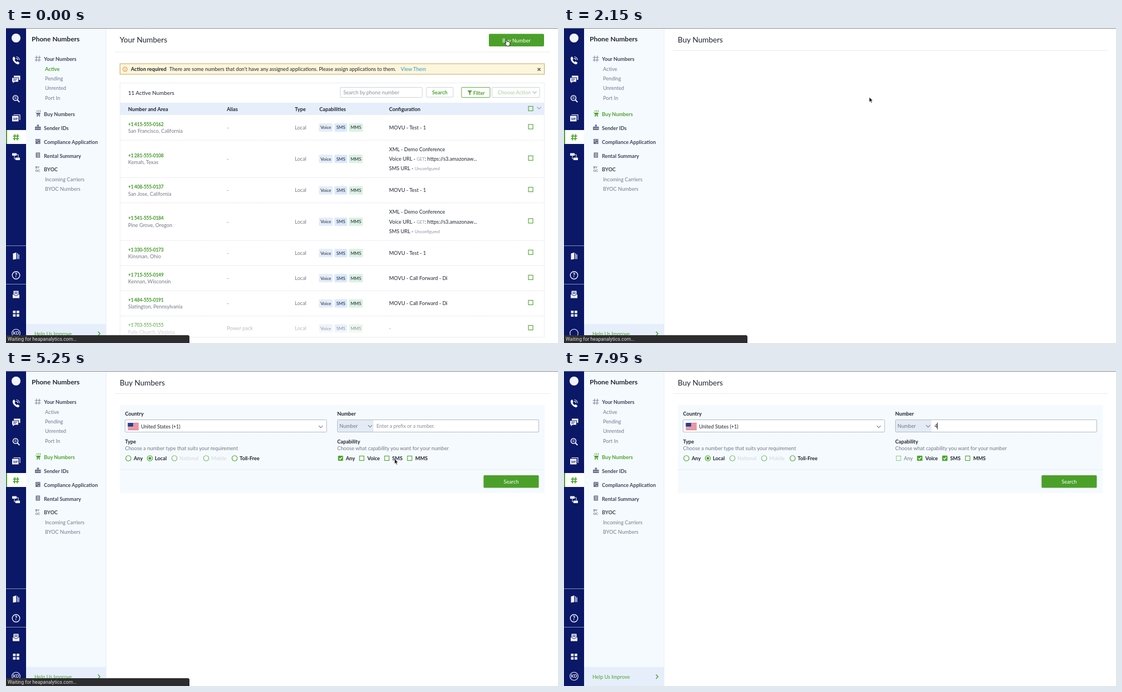
An HTML page for the animation above (8 s loop, 990x565 px).

```html
<!DOCTYPE html>
<html lang="en">
<head>
<meta charset="utf-8">
<title>Buy Numbers</title>
<style>
html,body{margin:0;width:100%;height:100%;overflow:hidden;background:#fff}
svg{display:block}
text{font:9.2px Lato,sans-serif;fill:#1f2530;white-space:pre}
.b,.b text{font-weight:700}
.side text{fill:#3c4557}
.side .sub{fill:#727b8c;font-size:9.1px;letter-spacing:.03px}
.side .on,.on{fill:#4ba32c}
.h1{font-size:13.6px}
.grey{fill:#737983}
.mini{font-size:7.6px;fill:#8d939e}
.num{font-size:8.6px;font-weight:700;letter-spacing:-.33px;fill:#3f9a25}
.tag{font-size:8px;text-anchor:middle}
.line{fill:none;stroke:#4ba32c;stroke-width:1.1}
.chev{fill:none;stroke:#6d7687;stroke-width:1.1}
.white{fill:#fff}
.mid{text-anchor:middle}

/* Hard switches; percentages are ms / 80, a few ms ahead of the change */
.k{animation:8s step-end infinite}
@keyframes list{0%{opacity:1}11.8%,to{opacity:0}}
@keyframes buy{0%{opacity:0}11.8%,to{opacity:1}}
@keyframes cart{0%{opacity:0}15.56%,to{opacity:1}}
@keyframes initials{0%{opacity:1}11.8%{opacity:0}30.56%,to{opacity:1}}
@keyframes form{0%{opacity:0}30.56%,to{opacity:1}}
@keyframes flag{0%{opacity:0}33.06%,to{opacity:1}}
@keyframes any-type{0%{opacity:1}56.81%,to{opacity:0}}
@keyframes local{0%{opacity:0}56.81%,to{opacity:1}}
@keyframes any-cap{0%{opacity:1}71.81%,to{opacity:0}}
@keyframes voice{0%{opacity:0}71.81%,to{opacity:1}}
@keyframes sms{0%{opacity:0}78.06%,to{opacity:1}}
@keyframes hint{0%{opacity:1}98.69%,to{opacity:0}}
@keyframes typed{0%{opacity:0}98.69%,to{opacity:1}}
@keyframes caret{0%{opacity:0}85.56%{opacity:1}91.81%{opacity:0}98.06%{opacity:1}98.69%,to{opacity:1;transform:translateX(4px)}}
@keyframes hand{0%{opacity:1}26.81%{opacity:0}52.44%{opacity:1}60.56%{opacity:0}68.06%{opacity:1}79.94%,to{opacity:0}}
@keyframes arrow{0%{opacity:0}26.81%{opacity:1}52.44%{opacity:0}60.56%{opacity:1}68.06%{opacity:0}79.94%{opacity:1}81.19%,to{opacity:0}}
@keyframes beam{0%{opacity:0}81.19%{opacity:1}84.31%,to{opacity:0}}

.status{animation:status 8s linear infinite}
@keyframes status{
  0%{opacity:1}4.375%,11.8%{opacity:0}11.81%,71.1%{opacity:1}75.6%,to{opacity:0}
}
.cursor{animation:move 8s linear infinite}
@keyframes move{
  0%,20.625%{transform:translate(897px,21px)}
  21.25%{transform:translate(820px,44px)}
  21.875%{transform:translate(680px,90px)}
  22.5%{transform:translate(585px,117px)}
  23.125%,38.75%{transform:translate(547.5px,124px)}
  39.375%{transform:translate(535px,126px)}
  40.625%{transform:translate(430px,143px)}
  41.875%{transform:translate(312px,157px)}
  42.5%{transform:translate(293px,157px)}
  45.625%,50%{transform:translate(273px,156px)}
  53.125%,60%{transform:translate(259.5px,154.5px)}
  61.25%{transform:translate(400px,149px)}
  61.875%{transform:translate(560px,144px)}
  62.5%{transform:translate(680px,153px)}
  63.125%,64.375%{transform:translate(727.5px,160px)}
  66.5%{transform:translate(676px,156px)}
  68.75%,71.875%{transform:translate(647px,154px)}
  75.625%,79.375%{transform:translate(696px,154px)}
  80%{transform:translate(697px,142px)}
  81.25%{transform:translate(696px,108px)}
  81.875%,to{transform:translate(695px,98.5px)}
}
</style>
</head>
<body>
<svg width="990" height="565" viewBox="0 0 990 565">
<defs>
  <linearGradient id="fade" x2="0" y2="1"><stop stop-color="#fff" stop-opacity=".1"/><stop offset="1" stop-color="#fff" stop-opacity=".85"/></linearGradient>
  <path id="chev" d="M-3.5-1.8 0 1.8 3.5-1.8"/>
  <path id="hash" d="M-2-5.5-3 5.5M3-5.5 2 5.5M-5.5-2.2H5.5M-5.5 2.4H5.5"/>
  <g id="tick"><rect x="-4.5" y="-4.5" width="9" height="9" rx="1" fill="#4ba32c"/><path d="M-2.5 0-.7 2 2.7-2" fill="none" stroke="#fff" stroke-width="1.3"/></g>
  <rect id="box" x="-4" y="-4" width="8" height="8" class="line"/>
  <circle id="radio" r="4.7" class="line"/>
  <g id="cart"><path d="M52 151h1.8l1.4 4.5h5.6l1.2-3.5h-7.2zM55 156h6v1h-6z"/><circle cx="56" cy="158.3" r="1"/><circle cx="60" cy="158.3" r="1"/><path d="M55 147.5v2.6M57 148h1.5l-1.5 2h1.7M60 148h1.7v2H60" fill="none" stroke="currentColor" stroke-width=".8"/></g>
</defs>

<rect width="990" height="565" fill="#fff"/>

<!-- navigation rail -->
<rect width="36" height="565" fill="#0a1867"/>
<path d="M0 390.5H36M0 459.5H36" stroke="#8990b8"/>
<path d="M0 183H36V208H0z" fill="#fff"/>
<path d="M0 183H2V208H0z" fill="#4ba32c"/>
<use href="#hash" x="18" y="196" fill="none" stroke="#4ba32c" stroke-width="1.8"/>
<g fill="#f2f4fc">
  <circle cx="18" cy="18" r="8"/>
  <path d="M12 53l2.5-2 2.5 4-1.5 1.7q1 3 3.5 4.3l1.8-1.2 3.7 2.8-2 2.4q-3 1-7-3-4.5-4.5-3.5-9z"/>
  <path d="M18.5 51.5q5 .7 5.8 6M18.2 54.3q2.8.3 3.3 3" fill="none" stroke="#f2f4fc" stroke-width="1.2"/>
  <path d="M14 85.5h11.5v7.5H23v-4.5h-9z"/><path d="M11 89.5h11v7h-6.5l-3 2.5v-2.5H11z"/>
  <path d="M13 91.7h7M13 94h5" stroke="#0a1867" stroke-width=".9"/>
  <circle cx="17" cy="125.5" r="4.5" fill="none" stroke="#f2f4fc" stroke-width="1.6"/><path d="M20.3 129l4 4" stroke="#f2f4fc" stroke-width="2"/><path d="M15 124h4M15 126.5h4" stroke="#f2f4fc"/>
  <path d="M11 157.5h11.5v10H11z"/><path d="M13.5 155.5h11.5v9.5" fill="none" stroke="#f2f4fc" stroke-width="1.2"/>
  <text x="16.8" y="164.8" class="b mid" style="font-size:5.5px;fill:#0a1867">SIP</text>
  <path d="M11 224.5h8v4.5h-8zM17 232.5h8v4.5h-8z"/><path d="M15 229v5.7h3M19 227h3v5.5" fill="none" stroke="#f2f4fc"/>
  <path d="M12.5 404.5l6-2v12l-6 1zM20 404h1.3v10.5H20zM22.4 406h1.3v8.5h-1.3z"/>
  <circle cx="18" cy="443.5" r="6.7" fill="none" stroke="#f2f4fc" stroke-width="1.4"/><text x="18" y="447.3" class="b mid white" style="font-size:10.5px">?</text>
  <path d="M13.5 471.5h9v6l-4.5 2.5-4.5-2.5zM12 477.5l6 3.5 6-3.5v7H12z"/><path d="M15 474h6M15 476.3h6" stroke="#0a1867"/>
  <path d="M12.5 507h4.8v4.5h-4.8zM19 507h4.8v4.5H19zM12.5 513.3h4.8v4.5h-4.8zM19 513.3h4.8v4.5H19z"/>
  <circle cx="18" cy="547.5" r="7.3" fill="none" stroke="#f2f4fc" stroke-width="1.1"/>
  <text x="18" y="550.2" class="b mid white k" style="font-size:7.5px;animation-name:initials">KD</text>
</g>

<!-- sidebar -->
<rect x="36" width="143" height="565" fill="#f5faff"/>
<rect x="36" y="531" width="143" height="34" fill="#e6eefb"/>
<path d="M179.5 0V565" stroke="#e8eef6"/>
<g class="side">
  <text x="46" y="23.5" class="b" style="font-size:12px;fill:#1f2530">Phone Numbers</text>
  <g class="b">
    <text x="68" y="59.2">Your Numbers</text>
    <text x="68" y="183">Sender IDs</text>
    <text x="68" y="207.7">Compliance Application</text>
    <text x="68" y="232.5">Rental Summary</text>
    <text x="68" y="257.3">BYOC</text>
  </g>
  <text x="70" y="93.7" class="sub">Pending</text>
  <text x="70" y="110.8" class="sub">Unrented</text>
  <text x="70" y="128.7" class="sub">Port In</text>
  <text x="70" y="274.5" class="sub">Incoming Carriers</text>
  <text x="70" y="291.7" class="sub">BYOC Numbers</text>
  <g class="k" style="animation-name:list">
    <text x="70" y="76.5" class="b on">Active</text>
    <text x="68" y="158.2" class="b">Buy Numbers</text>
    <use href="#cart" fill="#66718a" color="#66718a"/>
  </g>
  <g class="k" style="animation-name:buy">
    <text x="70" y="76.5" class="sub">Active</text>
    <text x="68" y="158.2" class="b on">Buy Numbers</text>
    <use href="#cart" fill="#4ba32c" color="#4ba32c" class="k" style="animation-name:cart"/>
  </g>
  <use href="#hash" x="57" y="55" fill="none" stroke="#7a8498"/>
  <g fill="#66718a">
    <path d="M52 177h10.5v6H52zM55.5 173.5h3.5v3h-3.5z"/><path d="M53.5 180h2M56.5 180h2M59.5 180h2" stroke="#fff"/>
    <path d="M53 199h8.5v9H53z"/><path d="M54.5 201h3M54.5 203.5h2M58.5 201.5l2-1M57 206h3" stroke="#fff" stroke-width=".9"/>
    <path d="M53.5 223.5h7.5v9h-7.5z"/><path d="M55 225.7h5M55 228h5M55 230.3h5" stroke="#fff" stroke-width=".9"/>
  </g>
  <text x="52.5" y="252" style="font-size:6px">BY</text>
  <text x="52.5" y="257.5" style="font-size:6px">OC</text>
  <text x="51" y="551.5" class="on">Help Us Improve</text>
  <path d="M165 544.5l3.5 3.7-3.5 3.7" class="line" style="stroke-width:1.5"/>
</g>

<!-- active numbers page -->
<g class="k" style="animation-name:list">
  <text x="204" y="25.5" class="h1">Your Numbers</text>
  <path d="M195 43H975" stroke="#ececee"/>
  <rect x="866" y="10.5" width="99" height="22.5" rx="2" fill="#4ba02a"/>
  <text x="915.5" y="25.5" class="mid white">Buy Number</text>
  <rect x="204.5" y="64" width="761" height="19" fill="#fdf6dc" stroke="#c5a863"/>
  <circle cx="213.5" cy="74" r="3.9" fill="none" stroke="#e08a2c"/><path d="M213.5 71.5v1M213.5 73.3v3" stroke="#e08a2c"/>
  <text x="224" y="77.2" class="b">Action required</text>
  <text x="293" y="77.2" style="font-size:9.1px">There are some numbers that don't have any assigned applications. Please assign applications to them.</text>
  <text x="708" y="77.2" style="fill:#2a98d0">View Them</text>
  <path d="M953.5 71.8l5 5M958.5 71.8l-5 5" stroke="#5c5f5f" stroke-width="1.6"/>
  <rect x="204.5" y="98.5" width="761" height="456" fill="none" stroke="#eceef2"/>
  <text x="219" y="120" style="font-size:9.8px">11 Active Numbers</text>
  <g fill="#fff" stroke="#cfd3d9">
    <rect x="599.5" y="106.5" width="147" height="18" rx="1"/>
    <rect x="754" y="106.5" width="48" height="17.5" rx="1"/>
    <rect x="817" y="106.5" width="51" height="18" rx="1" stroke="#5fae43"/>
    <rect x="871.5" y="106.5" width="85.5" height="18" rx="1"/>
  </g>
  <text x="605" y="119" style="fill:#8a9099">Search by phone number</text>
  <text x="778" y="118.5" class="b on mid">Search</text>
  <path d="M827.5 112h8.5l-3.2 4v4.5l-2-1.3V116z" fill="#4ba32c"/>
  <text x="838" y="119.5" class="b on" style="font-size:8.8px">Filter</text>
  <text x="882" y="119" style="fill:#a8cf9b">Choose Action</text>
  <use href="#chev" x="948" y="115.5" class="chev" opacity=".6"/>
  <rect x="204" y="134" width="762" height="22" fill="#e6eefb"/>
  <g class="b">
    <text x="219" y="148.7">Number and Area</text>
    <text x="396" y="148.7">Alias</text>
    <text x="518" y="148.7">Type</text>
    <text x="562" y="148.7">Capabilities</text>
    <text x="687" y="148.7">Configuration</text>
  </g>
  <use href="#box" x="941" y="144.5"/>
  <use href="#chev" x="956" y="143.5" class="chev" opacity=".7"/>
  <g id="rows"></g>
  <rect x="205" y="522" width="725" height="32" fill="url(#fade)"/>
</g>

<!-- purchase page -->
<g class="k" style="animation-name:buy">
  <text x="204" y="25.5" class="h1">Buy Numbers</text>
  <path d="M195 40.5H975" stroke="#ececee"/>
</g>
<g class="k" style="animation-name:form">
  <rect x="204" y="61" width="762" height="158" fill="#f5faff"/>
  <path d="M204 177H966" stroke="#e6ecf3"/>
  <g class="b">
    <text x="213.5" y="80">Country</text>
    <text x="594" y="80">Number</text>
    <text x="213.5" y="129.5">Type</text>
    <text x="594" y="129.5">Capability</text>
  </g>
  <text x="213.5" y="142" class="grey">Choose a number type that suits your requirement</text>
  <text x="594" y="142" class="grey">Choose what capability you want for your number</text>
  <rect x="213.5" y="87.5" width="361.5" height="22" rx="1.5" fill="#fff" stroke="#b4bac4"/>
  <g class="k" style="animation-name:flag">
    <rect x="218.5" y="93" width="19.5" height="13" fill="#fff"/>
    <path d="M228.25 93V106" stroke="#d0334a" stroke-width="19.5" stroke-dasharray="1 1"/>
    <rect x="218.5" y="93" width="9.5" height="7" fill="#2a3f8f"/>
  </g>
  <text x="242" y="103.2" style="font-size:9px">United States (+1)</text>
  <use href="#chev" x="564.5" y="100" class="chev"/>
  <rect x="594.5" y="87.5" width="361" height="22" rx="1.5" fill="#fff" stroke="#b4bac4"/>
  <path d="M595 88H659V109H595z" fill="#e5ebf4"/>
  <text x="598" y="102.2" class="grey">Number</text>
  <use href="#chev" x="653" y="99" class="chev"/>
  <text x="664.5" y="102.2" class="k" style="fill:#868d98;font-size:9px;animation-name:hint">Enter a prefix or a number.</text>
  <text x="664.5" y="102.2" class="k" style="font-size:9px;animation-name:typed">4</text>
  <path d="M665.5 92.5V104.5" stroke="#222" class="k" style="animation-name:caret"/>
  <use href="#radio" x="219.5" y="156.5"/>
  <use href="#radio" x="258" y="156.5"/>
  <use href="#radio" x="302" y="156.5" opacity=".75"/>
  <use href="#radio" x="359" y="156.5" opacity=".75"/>
  <use href="#radio" x="410" y="156.5"/>
  <circle cx="219.5" cy="156.5" r="2.5" fill="#4ba32c" class="k" style="animation-name:any-type"/>
  <circle cx="258" cy="156.5" r="2.5" fill="#4ba32c" class="k" style="animation-name:local"/>
  <g class="b">
    <text x="229" y="159.5">Any</text>
    <text x="267" y="159.5">Local</text>
    <text x="419" y="159.5">Toll-Free</text>
    <text x="648" y="159.5">Voice</text>
    <text x="692.5" y="159.5">SMS</text>
    <text x="734" y="159.5">MMS</text>
  </g>
  <text x="311" y="159.5" style="fill:#d3d7dd">National</text>
  <text x="368" y="159.5" style="fill:#d3d7dd">Mobile</text>
  <use href="#box" x="638" y="156.5"/>
  <use href="#box" x="683" y="156.5"/>
  <use href="#box" x="724" y="156.5"/>
  <g class="k" style="animation-name:any-cap"><use href="#tick" x="600" y="156.5"/><text x="609.5" y="159.5" class="b">Any</text></g>
  <g class="k" style="animation-name:voice">
    <use href="#box" x="600" y="156.5" opacity=".55"/><text x="609.5" y="159.5" class="grey">Any</text>
    <use href="#tick" x="638" y="156.5"/>
  </g>
  <use href="#tick" x="683" y="156.5" class="k" style="animation-name:sms"/>
  <rect x="856.5" y="187" width="99" height="22.5" rx="1.5" fill="#4ba02a"/>
  <text x="906" y="201.5" class="mid white">Search</text>
</g>

<path d="M0 .5H990" stroke="#85868c"/>

<g class="status">
  <path d="M0 551H326q3 0 3 3V565H0z" fill="#2d2d2f"/>
  <text x="3" y="561" style="font:8.7px Roboto,sans-serif;fill:#dcdcdc">Waiting for heapanalytics.com...</text>
</g>

<g class="cursor">
  <path class="k" style="animation-name:hand" d="M-.9.6Q0-.5.9.5L2 4l.8-.5q.8-.4 1.2.3 1-.6 1.5.3 1.1-.2 1.2 1l.2 2.4-1 3.8H1.2L-2.2 6.7q-.2-1.3 1-.9l1 .7z" fill="#fff" stroke="#111" stroke-width=".9" stroke-linejoin="round"/>
  <path class="k" style="animation-name:arrow" d="M0 0V9L2.1 7.1 3.5 10.4 5 9.7 3.6 6.5H6.3z" fill="#111" stroke="#fff" stroke-width=".6"/>
  <path class="k" style="animation-name:beam" d="M-2-6Q0-6 0-4.5V4.5Q0 6-2 6M2-6Q0-6 0-4.5M0 4.5Q0 6 2 6" fill="none" stroke="#222" stroke-width=".9"/>
</g>
</svg>
<script>
const label = (x, y, s, cls = '') => `<text x="${x}" y="${y}" class="${cls}">${s}</text>`;
const tag = (x, y, w, s, color) =>
  `<rect x="${x}" y="${y - 7.5}" width="${w}" height="15" rx="2" fill="${color}"/>` + label(x + w / 2, y + 2.9, s, 'tag');

const demo = y =>
  label(687, y - 14, 'XML - Demo Conference') +
  label(687, y + 3.2, 'Voice URL - <tspan class="mini">GET</tspan>: https://s3.amazonaw...') +
  label(687, y + 20.5, 'SMS URL - <tspan class="mini">Unconfigured</tspan>');
const flow = s => y => label(687, y + 3.2, s);
const test = flow('MOVU - Test - 1'), forward = flow('MOVU - Call Forward - Di');

const numbers = [
  ['415-555-0162', 'San Francisco, California', test],
  ['281-555-0108', 'Kemah, Texas', demo],
  ['408-555-0137', 'San Jose, California', test],
  ['541-555-0184', 'Pine Grove, Oregon', demo],
  ['330-555-0173', 'Kinsman, Ohio', test],
  ['715-555-0149', 'Kennan, Wisconsin', forward],
  ['484-555-0191', 'Slatington, Pennsylvania', forward],
  ['703-555-0155', 'Falls Church, Virginia', flow('-'), 'Power pack']
];

let rowTop = 156, markup = '';
for (const [num, city, config, alias = '-'] of numbers) {
  const height = config === demo ? 67.5 : 45.1, y = rowTop + height / 2;
  markup += label(219, y - 3, '+1 ' + num, 'num') + label(219, y + 9.5, city, 'grey') +
    label(396, y + 3.2, alias, 'grey') + label(518, y + 3.2, 'Local', 'grey') +
    tag(561, y, 25, 'Voice', '#e4edfa') + tag(589, y, 23, 'SMS', '#dbe9fb') + tag(615, y, 25, 'MMS', '#dcf1e3') +
    config(y) + `<use href="#box" x="941" y="${y - 1.5}"/>`;
  rowTop += height;
  if (rowTop < 550) markup += `<path d="M205 ${rowTop}H965" stroke="#e3e5e9" stroke-dasharray="2 1"/>`;
}
document.getElementById('rows').innerHTML = markup;
</script>
</body>
</html>
```
